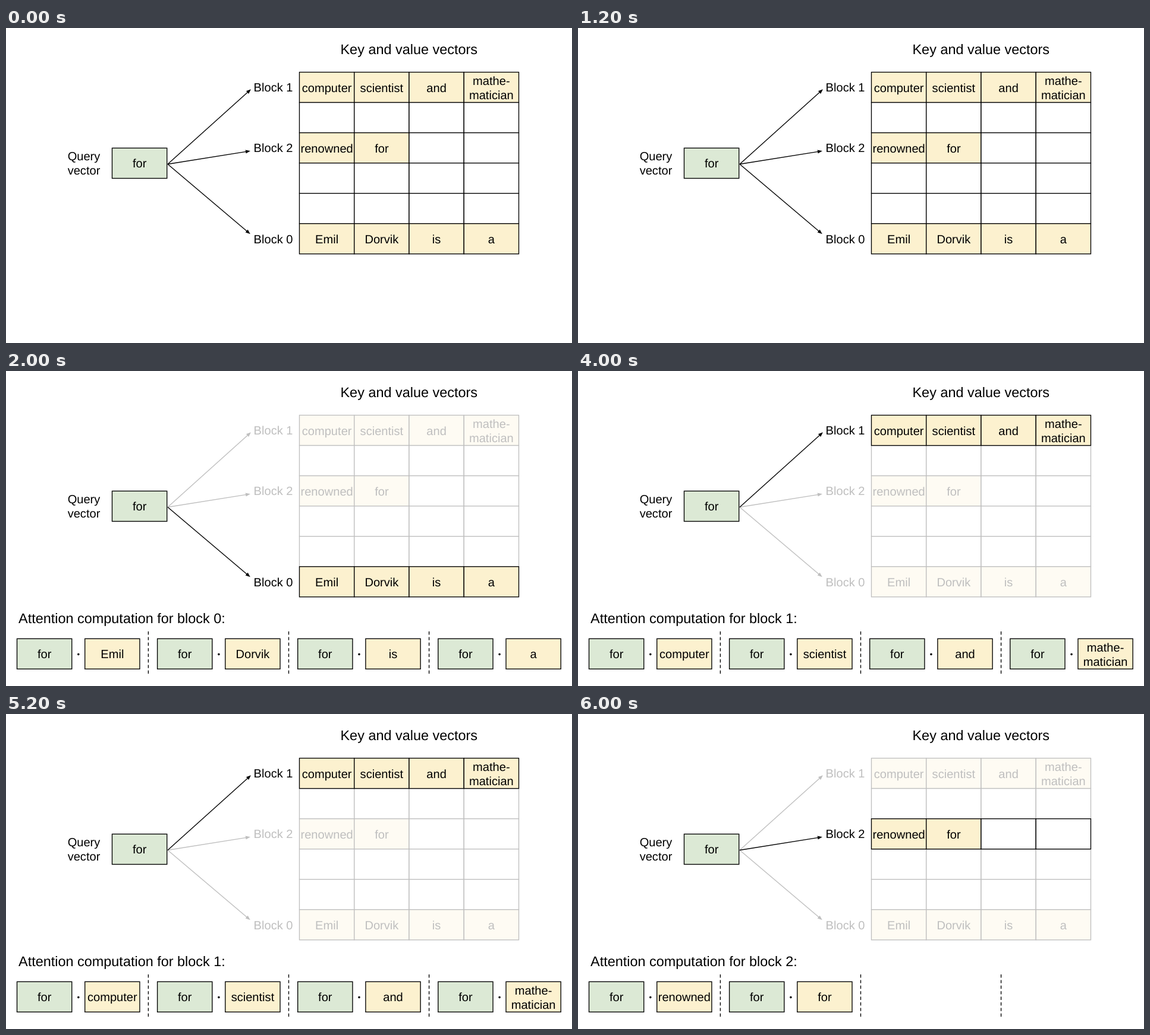
These frames come from a looping animation (952 by 531 pixels, 8000 ms). An HTML page:

```html
<!DOCTYPE html>
<html lang="en">
<head>
<meta charset="utf-8">
<title>Block attention</title>
<style>
  html, body { margin: 0; width: 100%; height: 100%; overflow: hidden; background: #fff; }
  svg { display: block; width: 100%; height: 100%; }
  text { font-family: "Liberation Sans", Arial, sans-serif; font-size: 20.1px; text-rendering: geometricPrecision; }
  .title { font-size: 23.45px; }
</style>
</head>
<body>
<svg id="stage" viewBox="0 0 952 531"></svg>
<script>
const stage = document.getElementById("stage");
const STEP = 2000;
const INK = "#000", DIM_INK = "#bfbfbf";
const YELLOW = "#fcf1cf", DIM_YELLOW = "#fefbf3", GREEN = "#dce9d5";
const CELL = { w: 92.25, h: 51.05 };
const GRID = { x: 493.5, y: 74.5, rows: 6, cols: 4 };
const START = { x: 272, y: 229.5 };

const blocks = [
  { row: 5, words: ["Emil", "Dorvik", "is", "a"], tip: [410.8, 347.3] },
  { row: 0, words: ["computer", "scientist", "and", "mathe-|matician"], tip: [412, 103.3] },
  { row: 2, words: ["renowned", "for"], tip: [411, 207.3] }
];
// Block shown in each step; -1 shows all of them.
const order = [-1, 0, 1, 2];

const label = (x, y, s, fill = INK, anchor = "middle", cls = "") =>
  `<text x="${x}" y="${y}" fill="${fill}" text-anchor="${anchor}" class="${cls}">${s}</text>`;

function box(x, y, fill, ink, words = "") {
  const lines = words.split("|");
  const cx = x + CELL.w / 2, cy = y + CELL.h / 2;
  const first = lines.length > 1 ? cy - 3.8 : cy + 7.5;
  return `<rect x="${x}" y="${y}" width="${CELL.w}" height="${CELL.h}" fill="${fill}" stroke="${ink}" stroke-width="1.35"/>` +
    lines.map((s, i) => label(cx, first + i * 23.8, s, ink)).join("");
}

function arrow([x, y], ink) {
  const dx = x - START.x, dy = y - START.y, len = Math.hypot(dx, dy);
  const angle = Math.atan2(dy, dx) * 180 / Math.PI;
  return `<g transform="translate(${START.x} ${START.y}) rotate(${angle})" fill="${ink}">
    <path d="M0 0H${len - 7}" stroke="${ink}" stroke-width="1.35"/>
    <path d="M${len} 0l-8-3.1v6.2z"/></g>`;
}

function tableRow(row, active) {
  const id = blocks.findIndex(b => b.row === row);
  const on = active < 0 || id === active;
  const ink = on ? INK : DIM_INK;
  const words = id < 0 ? [] : blocks[id].words;
  const y = GRID.y + row * CELL.h;
  let out = "";
  for (let c = 0; c < GRID.cols; c++) {
    const fill = !words[c] ? "#fff" : on ? YELLOW : DIM_YELLOW;
    out += box(GRID.x + c * CELL.w, y, fill, ink, words[c]);
  }
  if (id >= 0) {
    out += label(416.6, y + CELL.h / 2 + 7.3, "Block " + id, ink, "start");
    out += arrow(blocks[id].tip, ink);
  }
  return out;
}

function products(id) {
  const y = 451.3;
  let out = label(21, 424.6, `Attention computation for block ${id}:`, INK, "start", "title");
  for (let i = 0; i < 4; i++) {
    const x = 18.5 + i * 236.1, word = blocks[id].words[i];
    if (word) {
      out += box(x, y, GREEN, INK, "for") + box(x + 114.2, y, YELLOW, INK, word);
      out += `<circle cx="${x + 103.3}" cy="477.6" r="1.8"/>`;
    }
    if (i) out += `<path d="M${x - 15.2} 439V514" stroke="#000" stroke-width="1.35" stroke-dasharray="5.4 4"/>`;
  }
  return out;
}

function draw(active) {
  const rows = [...Array(GRID.rows).keys()];
  // The highlighted row goes last so its outline stays on top.
  if (active >= 0) rows.push(rows.splice(blocks[active].row, 1)[0]);
  stage.innerHTML =
    label(677.8, 43.6, "Key and value vectors", INK, "middle", "title") +
    label(131, 223.4, "Query") + label(131, 247.2, "vector") +
    rows.map(r => tableRow(r, active)).join("") +
    box(178.5, 202.4, GREEN, INK, "for") +
    (active < 0 ? "" : products(active));
}

let shown = null;
function tick() {
  const step = Math.floor(performance.now() / STEP) % order.length;
  if (step !== shown) draw(order[shown = step]);
  requestAnimationFrame(tick);
}
tick();
</script>
</body>
</html>
```
